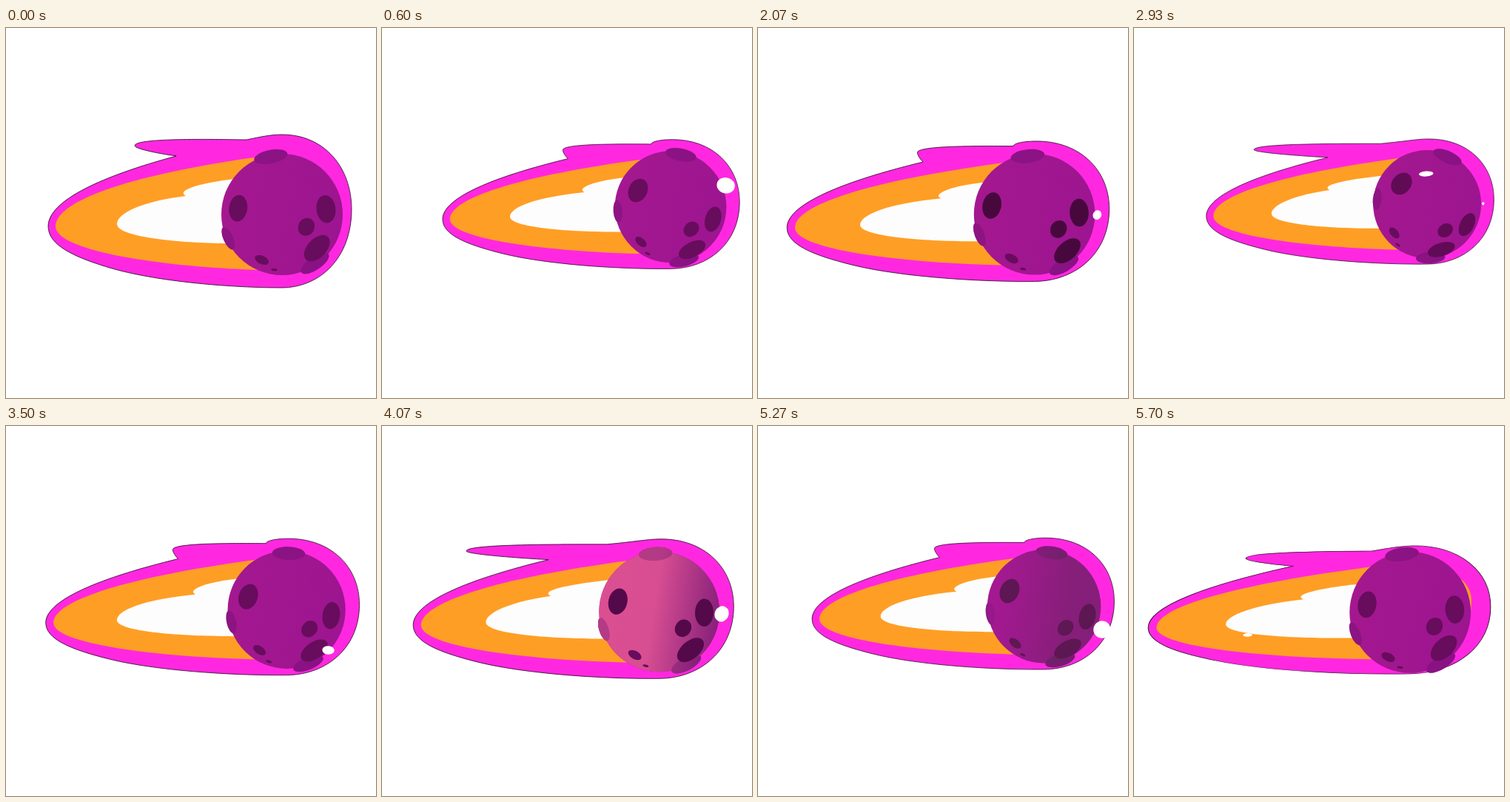
Recreate the animation shown at these times as an HTML page with a canvas. Size 500x500 px, loop 5730 ms.

```html
<!DOCTYPE html>
<html lang="en">
<head>
<meta charset="utf-8">
<title>Comet</title>
<style>
html, body { margin: 0; width: 100%; height: 100%; overflow: hidden; background: #fff; }
canvas { display: block; width: 500px; height: 500px; }
</style>
</head>
<body>
<canvas id="stage" width="500" height="500"></canvas>
<script>
const ctx = document.getElementById('stage').getContext('2d');
const LOOP = 5730;
const HALF = 24;               // drawings from one end of the sway to the other
const BALL = { x: 373, y: 252, r: 82 };
const PINK = '#ff28e0', ORANGE = '#ff9e24', WHITE = '#fdfdfd', GRAY = '#3f3a36';

// Marks on the sphere: angle in degrees, distance from the middle, size
const CRATERS = [
  [-7, 0.73, 0.23], [27, 0.45, 0.15], [44, 0.8, 0.26],
  [188, 0.73, 0.22], [114, 0.82, 0.12], [98, 0.92, 0.05]
];
const BUMPS = [[259, 0.97, 0.28], [156, 0.97, 0.2], [56, 0.97, 0.27]];

const mix = (a, b, t) => a + (b - a) * t;
const clamp = v => Math.min(1, Math.max(0, v));
const rad = deg => deg * Math.PI / 180;

// 25 drawings per second shown on a 30 Hz clock: every sixth tick repeats
function drawingAt(ms) {
  const tick = Math.floor((ms + 4) * 0.03);
  return Math.floor(tick / 6) * 5 + Math.max(0, tick % 6 - 1);
}

function ease(u) {
  return u < 0.5 ? Math.pow(2 * u, 2.2) / 2 : 1 - Math.pow(2 - 2 * u, 2.2) / 2;
}

function oval(x, y, rx, ry, angle, fill) {
  ctx.beginPath();
  ctx.ellipse(x, y, rx, ry, angle, 0, 7);
  ctx.fillStyle = fill;
  ctx.fill();
}

function drawFlame(n) {
  const squash = n % 2 ? 0.5 : n % 4 / 2;
  const wave = Math.sin(n * Math.PI / 2);
  const tip = 174 - 49 * wave, join = 325 - 20 * wave, lick = 240 - 10 * wave;

  ctx.save();
  ctx.transform(1, -0.02 * squash, 0, 1, 0, 0.02 * squash * BALL.x);
  ctx.translate(57 - 38.5 * squash, 144 + 18 * squash);
  ctx.scale(1 + 0.13 * squash, 1 - 0.164 * squash);
  ctx.translate(-57, -144);

  const pink = new Path2D(`M57 268 C57 233 130 200 230 173
    C${mix(230, tip, 0.5)} 169 ${tip} 163 ${tip} 159
    C${tip} 149 ${mix(tip, join, 0.6)} 150 ${join} 151
    C345 147 357 144 373 144 C430 144 467 188 467 245
    C467 310 425 351 372 351 C300 351 200 342 140 324 C90 309 57 293 57 268Z`);
  ctx.fillStyle = PINK;
  ctx.fill(pink);
  ctx.lineWidth = 0.9;
  ctx.strokeStyle = 'rgba(20,0,20,.85)';
  ctx.stroke(pink);

  ctx.fillStyle = ORANGE;
  ctx.fill(new Path2D(`M67 268 C67 235 160 200 335 175 C390 169 444 185 444 235
    C444 305 400 328 340 327 C200 322 67 300 67 268Z`));

  ctx.fillStyle = WHITE;
  ctx.fill(new Path2D(`M150 265 C150 250 185 234 ${lick + 3} 227
    Q${lick - 1} 225 ${lick} 222 C${lick + 5} 214 280 207 310 204
    L340 204 L340 292 L292 291 C230 290 150 282 150 265Z`));
  ctx.restore();
}

// Rolls the sphere in the picture plane, then tips it towards the lower right
function drawMarks(marks, turn, fill) {
  const tilt = rad(10 * turn);
  for (const [deg, dist, size] of marks) {
    const a = rad(deg + 33 * turn);
    const x = dist * Math.cos(a), y = dist * Math.sin(a), z = Math.sqrt(1 - dist * dist);
    const p = (x + y) * Math.SQRT1_2;
    const shift = (p * (Math.cos(tilt) - 1) + z * Math.sin(tilt)) * Math.SQRT1_2;
    const depth = z * Math.cos(tilt) - p * Math.sin(tilt);
    const px = x + shift, py = y + shift;
    oval(BALL.x + px * BALL.r, BALL.y + py * BALL.r,
      size * Math.max(depth, 0.4) * BALL.r, size * BALL.r, Math.atan2(py, px), fill);
  }
}

function across(...stops) {
  const g = ctx.createLinearGradient(BALL.x - BALL.r, BALL.y - 12, BALL.x + BALL.r, BALL.y + 12);
  for (const [at, color] of stops) g.addColorStop(at, color);
  return g;
}

function drawBall(turn, age) {
  const blush = clamp(1 - Math.abs(age - 5) / 2);
  const shade = clamp((age - 5) / 2) * clamp((12 - age) / 4);
  const deep = 0.6 * clamp(1 - Math.abs(age - 3.5) / 3);

  const body = fill => {
    drawMarks(BUMPS, turn, fill);
    oval(BALL.x, BALL.y, BALL.r, BALL.r, 0, fill);
  };
  const layer = (alpha, paint) => {
    ctx.globalAlpha = alpha;
    paint();
    ctx.globalAlpha = 1;
  };

  body(across([0, '#a4188f'], [1, '#9c1590']));
  layer(blush, () => body(across([0, '#db4f92'], [0.45, '#d84e92'], [1, '#86207a'])));
  layer(0.3, () => drawMarks(BUMPS, turn, '#5a0c68'));
  layer(shade, () => body(across([0, '#a81c9a'], [0.2, '#961f88'], [0.7, GRAY])));
  drawMarks(CRATERS, turn, '#680c5d');
  layer(deep, () => drawMarks(CRATERS.slice(0, 4), turn, '#26061f'));
  layer(shade, () => drawMarks(CRATERS, turn, GRAY));
}

// Swells at the nose, then speeds away along an arc over or under the ball
function drawSpark(age, side, pace) {
  const flight = Math.max(0, age - 8) * pace;
  if (age <= 0 || flight > 25) return;
  const thin = clamp(flight / 16);
  const swell = 3.8 * Math.min(age, 8);
  const x = 85 - 70 * Math.pow(flight / 16, 3.5);
  const y = Math.min(age - 2, 5) + side * 53 * Math.sin(Math.PI * flight / 29);
  const w = mix(swell, 22 / pace, thin), h = mix(swell * 1.15, 8 / pace, thin);
  oval(BALL.x + x, BALL.y + y, w / 2, h / 2, rad(mix(25, -4, thin)), '#fff');
}

function draw(ms) {
  const n = drawingAt(ms);
  const u = n / HALF % 2;
  const turn = u < 1 ? u : 2 - u;
  const size = 1 - 0.11 * ease(turn);
  const age = n % (2 * HALF);

  ctx.setTransform(1, 0, 0, 1, 0, 0);
  ctx.fillStyle = '#fff';
  ctx.fillRect(0, 0, 500, 500);
  ctx.translate(584, 125);
  ctx.scale(size, size);
  ctx.translate(-584, -125);

  drawFlame(n);
  drawBall(turn, n % HALF);
  drawSpark(age, -1, 1);
  drawSpark(age - HALF, 1, 1.74);
}

const began = performance.now();
function tick() {
  draw((performance.now() - began) % LOOP);
  requestAnimationFrame(tick);
}
tick();
</script>
</body>
</html>
```
